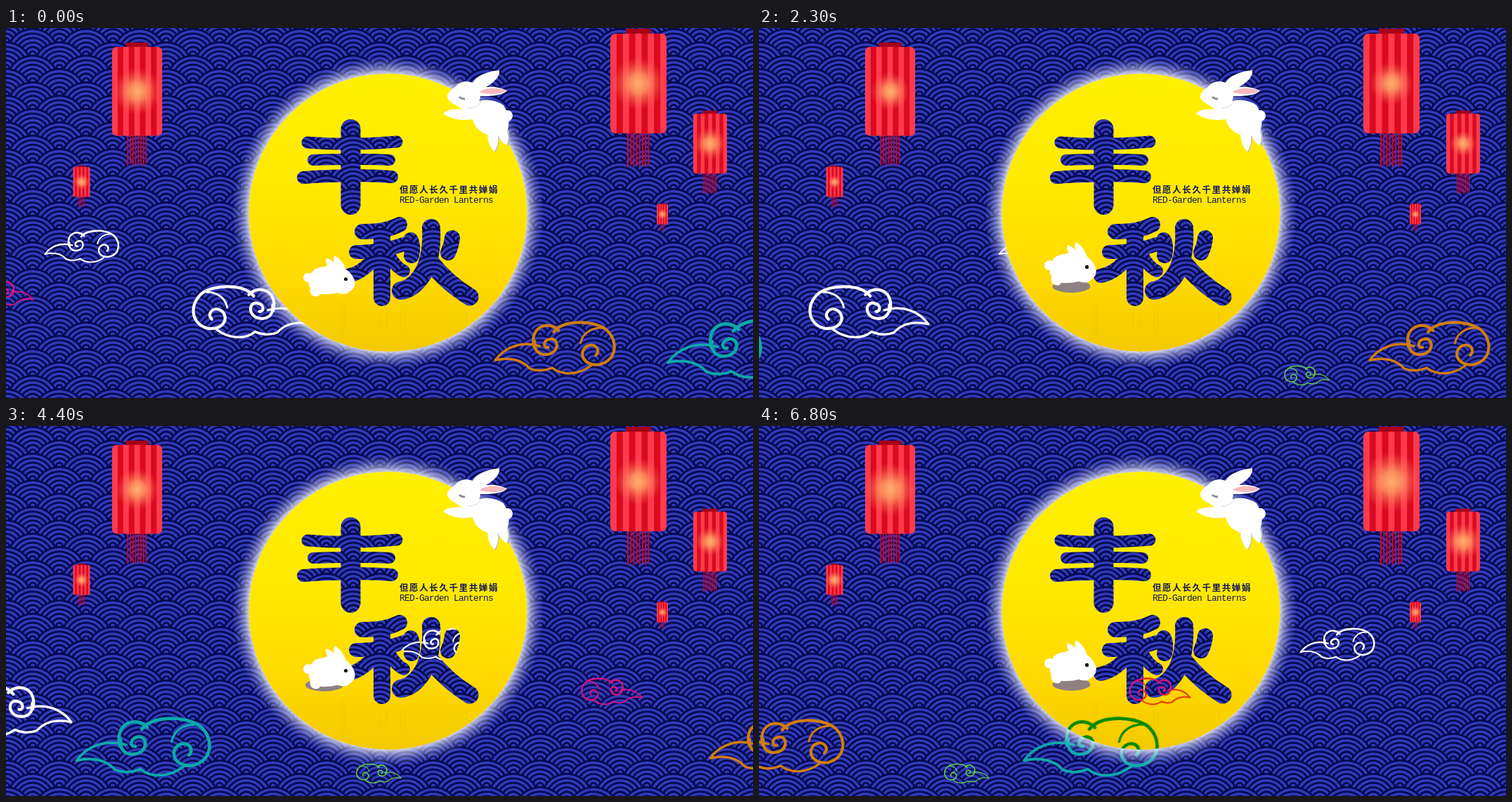
Recreate the animation shown at these times as an HTML page. Size 1063 px wide and 527 px high, loop 6.9 s.

```html
<!DOCTYPE html>
<html lang="zh">
<head>
<meta charset="utf-8">
<title>丰秋</title>
<style>
  html, body { margin: 0; width: 100%; height: 100%; overflow: hidden; background: #06094f; }
  svg { display: block; width: 100vw; height: 100vh; }
  .line path { fill: none; stroke-linecap: round; stroke-linejoin: round; }
  #over { mix-blend-mode: multiply; }
  .poem { font: 900 12.5px "Noto Sans CJK SC", "Noto Sans CJK", sans-serif; letter-spacing: 1.6px; }
  .sub { font: 13px "Liberation Mono", "Noto Sans Mono", monospace; letter-spacing: -0.8px; }
</style>
</head>
<body>
<svg viewBox="0 0 1063 527" preserveAspectRatio="none" xmlns="http://www.w3.org/2000/svg">
  <defs>
    <pattern id="waves" width="76" height="38" patternUnits="userSpaceOnUse"></pattern>
    <linearGradient id="gold" x1="0" y1="0" x2="0" y2="1">
      <stop offset="0" stop-color="#fff000"/>
      <stop offset=".38" stop-color="#ffea00"/>
      <stop offset=".75" stop-color="#ffd900"/>
      <stop offset="1" stop-color="#f3c900"/>
    </linearGradient>
    <radialGradient id="halo" gradientUnits="userSpaceOnUse" cx="543.5" cy="263" r="222">
      <stop offset=".885" stop-color="#fff" stop-opacity="0"/>
      <stop offset=".89" stop-color="#fff" stop-opacity=".8"/>
      <stop offset=".92" stop-color="#eef" stop-opacity=".5"/>
      <stop offset=".96" stop-color="#dfe2ff" stop-opacity=".2"/>
      <stop offset="1" stop-color="#ccd0ff" stop-opacity="0"/>
    </radialGradient>
    <radialGradient id="lamp">
      <stop offset="0" stop-color="#ffb070"/>
      <stop offset=".35" stop-color="#ff9a62" stop-opacity=".85"/>
      <stop offset="1" stop-color="#ff5a50" stop-opacity="0"/>
    </radialGradient>
    <mask id="cut" maskUnits="userSpaceOnUse" x="340" y="60" width="410" height="410">
      <circle cx="543.5" cy="263" r="198" fill="#fff"/>
      <g class="line" stroke="#000" stroke-width="20">
        <path stroke-width="28" d="M490.500 144V252"/>
        <path stroke-width="17" d="M429 163Q490 168 556 162"/>
        <path stroke-width="16" d="M437 188Q490 186 546 188"/>
        <path stroke-width="18" d="M423 213Q490 208 549 212"/>
        <path stroke-width="22" d="M507 290Q538 291 560 280"/>
        <path d="M498 319Q535 319 566 308"/>
        <path stroke-width="24" d="M535 294V384"/>
        <path d="M524 328Q506 350 486 353"/>
        <path stroke-width="18" d="M546 325Q556 342 566 346"/>
        <path stroke-width="22" d="M576 302Q580 312 577 324"/>
        <path stroke-width="26" d="M605 285Q607 320 596 345Q582 371 562 374"/>
        <path stroke-width="25" d="M603 332Q626 362 660 383"/>
        <path stroke-width="22" d="M635 299Q634 310 629 320"/>
      </g>
    </mask>
    <g id="cloud" class="line" stroke-width="4.200">
      <path stroke-width="3.400" d="M1 55C13 38 36 27 64 35"/>
      <path d="M56 36C49 8 76-3 91 13"/>
      <path d="M57 28C55 42 64 48 74 47C93 45 92 23 79 25C68 27 69 38 76 37"/>
      <path d="M84 15C98-3 140-2 158 11C177 27 174 55 150 61C128 65 118 46 130 36C142 28 152 41 144 48"/>
      <path stroke-width="3" d="M122 31C125 16 138 9 152 9"/>
      <path stroke-width="3.400" d="M1 55C25 50 40 56 50 67C62 72 72 70 82 66C96 77 118 77 137 63"/>
    </g>
    <g id="lantern"></g>
  </defs>

  <rect width="1063" height="527" fill="url(#waves)"/>
  <g id="lanterns"></g>
  <g id="under"></g>

  <circle cx="543.5" cy="263" r="222" fill="url(#halo)"/>
  <g mask="url(#cut)">
    <circle cx="543.5" cy="263" r="198" fill="url(#gold)"/>
    <g class="line" stroke="#e0b400" stroke-opacity=".4">
      <path d="M477 392V436H481V392M532 406V426L537 430L542 426V406M562 404V430L565 433L567 430V404M655 404V418"/>
    </g>
  </g>
  <g mask="url(#cut)" id="over"></g>

  <g fill="#15185c">
    <text class="poem" x="560" y="235">但愿人长久千里共婵娟</text>
    <text class="sub" x="560" y="249">RED-Garden Lanterns</text>
  </g>

  <g id="leaper" fill="#fff">
    <path fill="#b9b9c4" d="M684 150Q690 172 697 177Q702 165 702 154L715 168Q719 154 714 142Z"/>
    <path d="M661 83Q668 64 702 60Q704 74 676 88Z"/>
    <path d="M668 88Q690 79 713 89Q706 98 672 97Z"/>
    <path fill="#f6b9c0" d="M675 90Q692 82 712 89.500Q700 97 675 92Z"/>
    <ellipse cx="655" cy="96" rx="20" ry="20"/>
    <path d="M640 83Q624 94 629 101Q636 112 656 112Z"/>
    <path d="M662 108Q688 96 708 110Q720 130 713 146Q717 160 712 167Q704 162 700 152Q702 166 695 176Q686 168 685 152Q668 146 664 130Q640 134 622 122Q626 114 662 115Z"/>
    <circle cx="713" cy="125" r="8"/>
    <path d="M645 98Q648 101 653 101" fill="none" stroke="#8d8d98" stroke-width="3"/>
    <path d="M658 114Q672 114 676 104" fill="none" stroke="#dcdce4"/>
  </g>

  <g id="hopper">
    <ellipse id="shade" cx="443" cy="369" rx="27" ry="9" fill="#8e8182"/>
    <g id="bunny" fill="#fff">
      <circle cx="410" cy="339" r="7"/>
      <path d="M447 330Q432 319 436 310Q446 313 457 328Z"/>
      <path d="M452 327Q443 313 448 306Q461 314 465 331Z"/>
      <path d="M411 343Q413 324 432 323Q442 318 456 324Q470 327 476 343Q479 354 469 360Q464 366 452 362Q440 365 427 364Q424 370 416 366Q411 362 413 355Q410 350 411 343Z"/>
      <circle cx="463.500" cy="341.500" r="2.600" fill="#111"/>
    </g>
  </g>
</svg>
<script>
const $ = id => document.getElementById(id);
const LOOP = 6900, STEP = 100, WIDTH = 1063;
const clamp = v => Math.min(1, Math.max(0, v));
const smooth = v => v * v * (3 - 2 * v);
const disc = (x, y, r, fill) => `<circle cx="${x}" cy="${y}" r="${r}" fill="${fill}"/>`;
const bar = (x, y, w, h, fill, rx = 0) =>
  `<rect x="${x}" y="${y}" width="${w}" height="${h}" rx="${rx}" fill="${fill}"/>`;

// overlapping scales, back rows first
const R = 38, GAP = 6.4;
let scales = '';
for (let row = -1; row <= 4; row++) {
  for (let col = -1; col <= 2; col++) {
    const x = R * (2 * col + Math.abs(row % 2)), y = R / 2 * (row + 1);
    for (let r = R; r > 4; r -= GAP) {
      scales += disc(x, y, r, '#06094f') + disc(x, y, r - 2.8, '#2f3aba');
    }
  }
}
$('waves').innerHTML = scales;

// lantern body is 80 by 142
let lamp = bar(22, -7, 36, 9, '#a80018');
for (let i = 0; i < 8; i++) lamp += bar(24 + i * 4.2, 140, 2, 50 - i % 2 * 3, '#c4062a');
lamp += bar(0, 0, 80, 142, '#ff3a4c', 7);
for (let i = 0; i < 4; i++) lamp += bar(80 / 9 * (1 + 2 * i), 0, 80 / 9, 142, '#d90a20');
lamp += '<circle id="glow" cx="40" cy="71" r="30" fill="url(#lamp)"/>';
$('lantern').innerHTML = lamp;
$('lanterns').innerHTML = [
  [151, 27, .89], [860, 8, 1], [978, 122, .6], [95.5, 198, .3], [926, 251, .2]
].map(([x, y, s]) =>
  `<use href="#lantern" transform="translate(${x} ${y}) scale(${s})"/>`).join('');

// enter: when the cloud comes in at its edge, rate: how fast it slows per ms
const CROSSING = 13700, REACH = 1760;
const clouds = [
  { color: '#fff', y: 288, s: .616, enter: -1128, rate: 8e-5 },
  { color: '#fff', y: 367, s: .994, enter: -6526, rate: 8.17e-5, left: true },
  { color: '#d17d0d', y: 418, s: 1, enter: 5960, rate: 7.7e-5 },
  { color: '#0ba9aa', y: 415, s: 1.116, enter: 2272, rate: 7.6e-5 },
  { color: '#e3127f', y: 359, s: .506, enter: 2703, rate: 8.37e-5, left: true },
  { color: '#62cf4e', y: 481, s: .372, enter: 92, rate: 8.6e-5, left: true }
];

for (const c of clouds) {
  c.parts = ['under', 'over'].map(id => {
    const use = document.createElementNS('http://www.w3.org/2000/svg', 'use');
    use.setAttribute('href', '#cloud');
    use.setAttribute('stroke', c.color);
    return $(id).appendChild(use);
  });
}

function drift(c, t) {
  const w = 172 * c.s;
  const age = (t - c.enter + CROSSING) % CROSSING;
  const x = REACH - (REACH + w) * Math.exp(-c.rate * age);
  const place = c.left
    ? `translate(${WIDTH - x} ${c.y}) scale(${-c.s} ${c.s})`
    : `translate(${x} ${c.y}) scale(${c.s})`;
  c.parts.forEach(p => p.setAttribute('transform', place));
}

// slide back, then leap forward
function hop(t) {
  const ms = t % 900;
  const lift = Math.sin(Math.PI * clamp((ms - 300) / 600));
  const x = 20 * (1 - clamp(ms / 200) + smooth(clamp((ms - 450) / 200)));
  const y = 18 - 22 * lift;
  const squash = lift > .01 ? 1 : .95;
  $('bunny').setAttribute('transform',
    `translate(${x} ${y + 306 * (1 - squash)}) scale(1 ${squash})`);
  $('shade').setAttribute('transform', `translate(${x / 2} ${Math.min(y, 0)})`);
  $('shade').style.display = lift > .01 ? '' : 'none';
}

function draw(t) {
  clouds.forEach(c => drift(c, t));
  hop(t);
  $('glow').setAttribute('r', 37 + 6 * Math.cos(2 * Math.PI * (t - 1400) / 1800));
}

const start = performance.now();
function tick() {
  const t = (performance.now() - start) % LOOP;
  draw(Math.floor(t / STEP) * STEP);
  requestAnimationFrame(tick);
}
tick();
</script>
</body>
</html>
```
